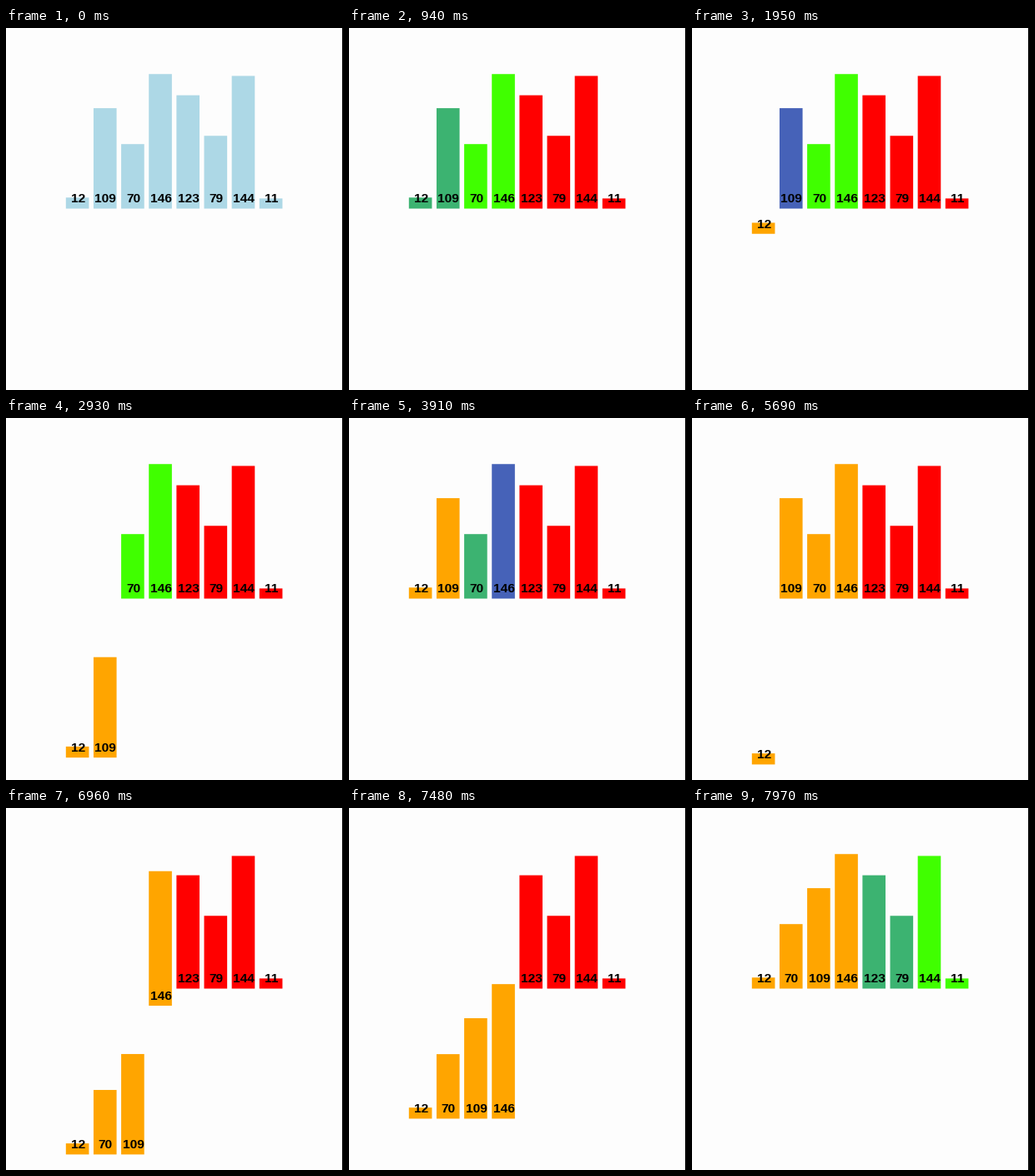
Animation, 404 px wide and 434 px high, one loop 8000 ms. Source, as a matplotlib script:

```python
import matplotlib.pyplot as plt
from matplotlib.animation import FuncAnimation
from matplotlib.patches import Rectangle

W, H, DPI = 404, 434, 100
LOOP, INTERVAL = 8000, 20
TICK = 40.66                # a pose is held for one tick
FIRST, BEAT = 411, 501.3    # the sort takes one step per beat
TRAVEL = 242                # ms a bar needs to change place

UNIT = 1.1047
LEFT, BASE = 65 * UNIT, 196 * UNIT
PITCH, WIDTH, DROP = 30 * UNIT, 25 * UNIT, 180 * UNIT

BACK, IDLE, MERGED = "#fdfdfd", "lightblue", "orange"
LEFT_HALF = "mediumseagreen"
RIGHT_HALF = ["#ff0000", "#40ff00", "#4662b8"]    # by depth

VALUES = [12, 109, 70, 146, 123, 79, 144, 11]


def merge_sort(order, lo, hi, depth=0):
    """Yield one list of (bar, slot, row, colour) per step of the sort."""
    if hi - lo < 2:
        return
    mid = (lo + hi) // 2
    yield [(order[s], s, 0, LEFT_HALF if s < mid else RIGHT_HALF[depth])
           for s in range(lo, hi)]
    yield from merge_sort(order, lo, mid, depth + 1)
    yield from merge_sort(order, mid, hi, depth + 1)

    # Bars drop to the lower row one by one, then rise together.
    order[lo:hi] = sorted(order[lo:hi], key=lambda bar: VALUES[bar])
    for s in range(lo, hi):
        yield [(order[s], s, 1, MERGED)]
    yield [(order[s], s, 0, MERGED) for s in range(lo, hi)]


COUNT = len(VALUES)
STEPS = list(merge_sort(list(range(COUNT)), 0, COUNT))


def pose(t):
    """Slot, row and colour of every bar at time t."""
    state = [(i, 0, IDLE) for i in range(COUNT)]
    for k, step in enumerate(STEPS):
        p = (t - FIRST - k * BEAT) / TRAVEL
        if p < 0:
            break
        p = min(p, 1)
        for i, slot, row, colour in step:
            a, b, _ = state[i]
            state[i] = (a + (slot - a) * p, b + (row - b) * p, colour)
    return state


fig = plt.figure(figsize=(W / DPI, H / DPI), dpi=DPI, facecolor=BACK)
ax = fig.add_axes([0, 0, 1, 1])
ax.set_xlim(0, W)
ax.set_ylim(H, 0)
ax.axis("off")
ax.add_patch(Rectangle((W - 1, 0), 1, H, color="black", lw=0))

bars, labels = [], []
for i, value in enumerate(VALUES):
    bar = Rectangle((0, 0), WIDTH, value * UNIT, lw=0, zorder=2 + i)
    bar.set_snap(False)
    bars.append(ax.add_patch(bar))
    labels.append(ax.text(0, 0, str(value), ha="center", va="baseline",
                          family="Liberation Sans", weight="bold",
                          size=14 * UNIT * 72 / DPI, color="black",
                          zorder=2.5 + i))


def draw(frame):
    t = int((frame * INTERVAL + 18) / TICK) * TICK
    for i, (slot, row, colour) in enumerate(pose(t)):
        x = LEFT + slot * PITCH
        foot = BASE + row * DROP
        bars[i].set_xy((x, foot - VALUES[i] * UNIT))
        bars[i].set_facecolor(colour)
        labels[i].set_position((x + WIDTH / 2 + 0.6, foot - 6.5 * UNIT))
    return bars + labels


anim = FuncAnimation(fig, draw, frames=LOOP // INTERVAL, interval=INTERVAL,
                     init_func=lambda: draw(0), repeat=True, repeat_delay=0)
plt.show()
```
